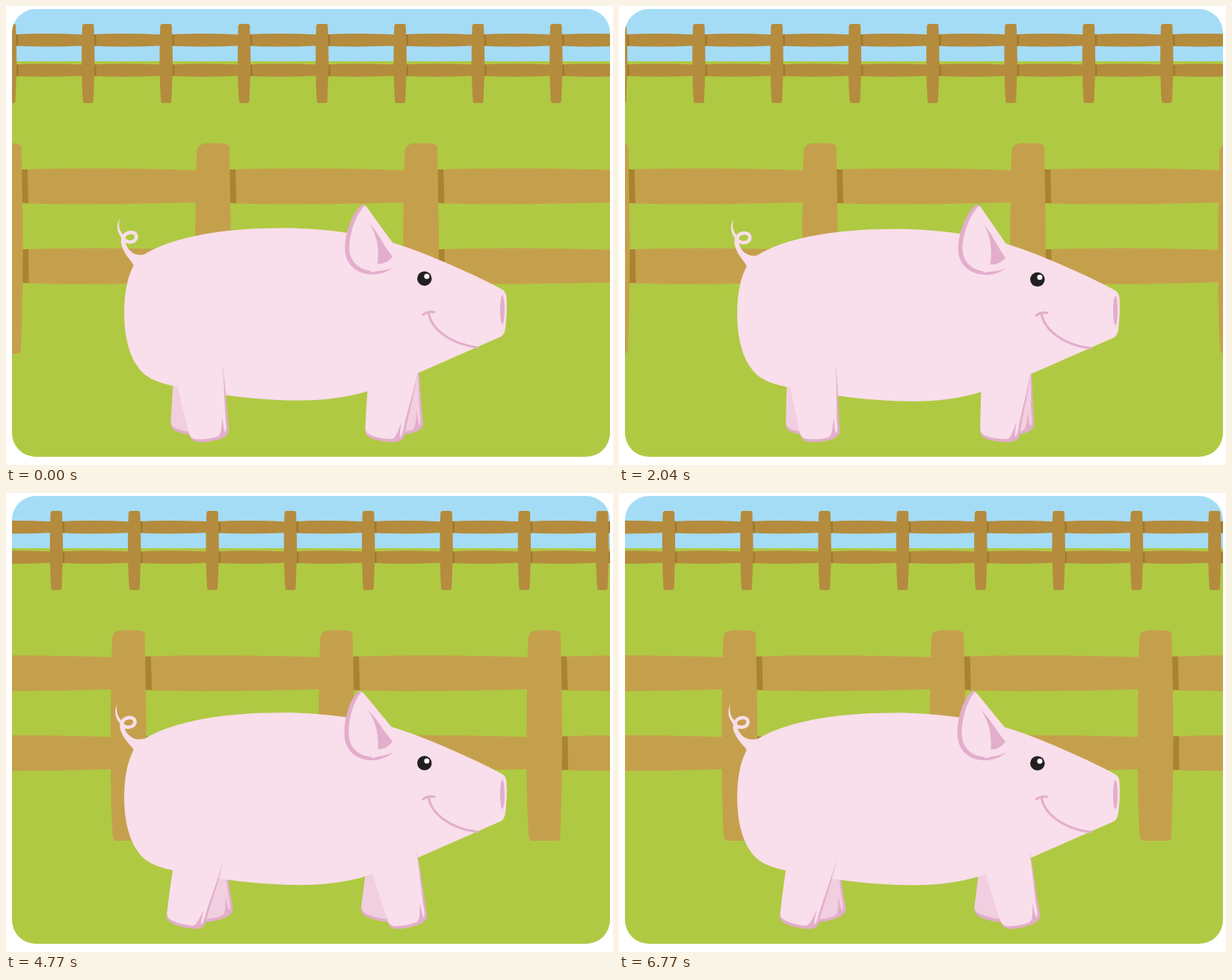
These frames come from a looping animation (812 by 615 pixels, 6.9 s). An HTML page without scripts:

```html
<!DOCTYPE html>
<html lang="en">
<head>
<meta charset="utf-8">
<title>Walking pig</title>
<style>
  @property --t { syntax: "<number>"; inherits: true; initial-value: 0; }

  html, body { margin: 0; width: 100%; height: 100%; overflow: hidden; background: #fff; }

  /* --t is the clock in seconds, --u the swing of the legs from -1 to 1 */
  svg {
    display: block;
    width: 812px;
    height: 615px;
    --u: cos((var(--t) / 1.982 - .865) * 360deg);
    --lift: (.436 - var(--u) * var(--u));
    animation: clock 6.9s steps(1) infinite;
  }

  .far-fence { transform: translateX(calc(var(--t) / 1.982 * -104.33px)); }
  .near-fence { transform: translateX(calc(var(--t) / 1.982 * -278.2px)); }
  .body { transform: translateY(calc(var(--lift) * 6.6px)); }
  .ear, .tail { transform: rotate(calc(var(--lift) * 7.3deg)); }
  .ear { transform-origin: 517px 336px; }
  .tail { transform-origin: 178px 340px; }
  .fore { transform: rotate(calc(var(--u) * -13.3deg)); }
  .back { transform: rotate(calc(var(--u) * 13.3deg)); }

  .skin { fill: #f9deeb; }
  .shade { fill: #e2aecb; }
  .line { fill: none; stroke: #e2aecb; stroke-width: 3; stroke-linecap: round; }
  .near { color: #f9deeb; }
  .far { color: #f1cfe0; }

  @keyframes clock {
    0% { --t: 0; }
    .724% { --t: .05; }
    10.144% { --t: .7; }
    11.304% { --t: .78; }
    20% { --t: 1.38; }
    21.739% { --t: 1.5; }
    29.565% { --t: 2.04; }
    31.304% { --t: 2.16; }
    32.608% { --t: 2.25; }
    41.594% { --t: 2.87; }
    43.333% { --t: 2.99; }
    51.884% { --t: 3.58; }
    53.623% { --t: 3.7; }
    63.478% { --t: 4.38; }
    64.782% { --t: 4.47; }
    69.13% { --t: 4.77; }
    70.869% { --t: 4.89; }
    73.913% { --t: 5.1; }
    75.217% { --t: 5.19; }
    83.913% { --t: 5.79; }
    85.652% { --t: 5.91; }
    94.637% { --t: 6.53; }
    96.376% { --t: 6.65; }
    98.115% { --t: 6.77; }
    100% { --t: 6.9; }
    .724%, 11.304%, 21.739%, 32.608%, 43.333%, 75.217%, 85.652% { animation-timing-function: steps(6); }
    53.623% { animation-timing-function: steps(7); }
    64.782% { animation-timing-function: steps(3); }
    70.869% { animation-timing-function: steps(2); }
  }
</style>
</head>
<body>
<svg viewBox="0 0 812 615" role="img" aria-label="A pig walking past wooden fences">
  <defs>
    <clipPath id="card"><rect x="8" y="4" width="800" height="600" rx="32"/></clipPath>

    <!-- far fence: one section, then doubled -->
    <g id="s1">
      <path id="srail" fill="#b58c3e" d="M10,38.3 Q55,35.6 106,38.2 V53.2 Q55,55.6 10,53.2Z"/>
      <use href="#srail" y="40.4"/>
      <path fill="#a0782c" d="M16,38.2H19.6L20,53.3H16ZM16,78.6H19.6L20,93.7H16Z"/>
      <path fill="#b58c3e" d="M1,28 Q1,24 4,24 H14 Q16.6,24 16.6,27 C17,45 18,65 17.6,85 L16,127 Q16,130 13.5,130 H4.5 Q2,130 2,127 C0,100 -.2,60 1,28Z"/>
    </g>
    <g id="s2"><use href="#s1"/><use href="#s1" x="104.33"/></g>
    <g id="s4"><use href="#s2"/><use href="#s2" x="208.66"/></g>
    <g id="s8"><use href="#s4"/><use href="#s4" x="417.32"/></g>

    <!-- near fence -->
    <g id="b1">
      <path id="brail" fill="#c5a04c" d="M40,219.2 Q150,215.4 281,220 V263 Q150,267.2 40,264.2Z"/>
      <use href="#brail" y="107"/>
      <path fill="#a9832f" d="M44,219H53.8L55,264H44ZM44,326H55L55.6,371H44Z"/>
      <path fill="#c5a04c" d="M2,196 Q2,185 14,184 Q24,183.4 36,184 Q45.4,184.4 45.6,190 C46,220 47.8,280 47.5,340 C47.4,390 46,430 45,460 Q44.6,466 39,466 H9 Q3.4,466 2.7,460 C.2,420 -.4,370 0,320 C0,270 1,220 2,196Z"/>
    </g>
    <g id="b2"><use href="#b1"/><use href="#b1" x="278.2"/></g>
    <g id="b4"><use href="#b2"/><use href="#b2" x="556.4"/></g>

    <!-- leg hanging straight down from the hip at 0,0 -->
    <g id="leg">
      <path class="shade" d="M31.7,-3 C31.5,28 27.4,58 27,82 Q26.6,90 16,92.8 C6,94.8 -9,95 -18,92.3 Q-26,90 -26.6,81 L-20,40Z"/>
      <path fill="currentColor" d="M-30,-10 L-32,15 C-30.5,45 -28,62 -26.6,79 Q-25.8,86.6 -19,88.4 C-8,91.2 4,91 11.5,89.4 C17,86 17.4,76 20.6,66 C20.4,76 20,82 21.4,85.4 Q24,83 24.2,76 C24.8,55 29.6,28 31.5,-3 L28,-10Z"/>
    </g>
  </defs>

  <g clip-path="url(#card)">
    <rect width="812" height="80" fill="#a5dcf5"/>
    <rect y="74" width="812" height="541" fill="#b0c943"/>

    <g class="far-fence">
      <use href="#s8" x="-3.4"/><use href="#s8" x="831.24"/>
    </g>
    <g class="near-fence">
      <use href="#b4" x="-25"/><use href="#b4" x="1087.8"/>
    </g>

    <g class="far">
      <g transform="translate(259 481)"><use href="#leg" class="back"/></g>
      <g transform="translate(519 481)"><use href="#leg" class="fore"/></g>
    </g>

    <g class="body">
      <g class="tail">
        <path class="skin" d="M172,350 C169,341 156,333 153.6,315 L159.5,313 C160,324 169,336 185,333 L190,345Z"/>
        <path d="M156.6,316 C155,307 162,303 168,303.4 C175,304 176.4,311 171.5,314.6 C167,317.6 160,316.4 156,311.5" fill="none" stroke="#f9deeb" stroke-width="4.6"/>
        <path class="skin" d="M158.5,315 C150,307 145.5,296 152.4,284.6 C148.8,296 153,304 160,310Z"/>
      </g>
      <path class="skin" d="M170.5,348 C172,340 182,333 205,322.5 C250,304 310,297.5 370,297.5 C400,297.5 430,300 457,304 L517,317 C550,327 580,340 610,353.5 C630,362.5 650,372 664,380 Q669,383 669.5,390 C670.4,405 669.6,420 668,432 Q667,440 662,443 L553,491 L484,516 C460,524 425,528.5 393,528.5 C355,528.3 325,525.5 295,521.4 L224,509 C200,504 185,497 176,483 C160,461 157,425 158.4,400 C159.5,380 163,362 170.5,348Z"/>
      <ellipse class="shade" cx="664" cy="407" rx="3" ry="19.5"/>
      <path class="line" d="M558,413.6 Q564.5,408.4 573,410.2 M565.4,412 C569,432 593,453 631,457.4"/>
      <circle cx="559.8" cy="365.2" r="9.7" fill="#231f20"/>
      <circle cx="562.9" cy="362.3" r="3.5" fill="#fff"/>
      <g class="ear">
        <path class="shade" d="M476,266.4 Q478.6,264.8 481,268 L488,277 L488,357 L518,350.4 C510,356 502,359.6 490,359.6 C469,359.4 453.6,346 453.4,325 C453.4,303 464,275 476,266.4Z"/>
        <path class="skin" d="M479.6,267.4 Q481.5,267.6 483.5,270.5 L520,321 L518,350.4 C511,353.4 501,355.6 490,355 C472,354 459.2,342 459.2,324 C459.4,304 468,280 479.6,267.4Z"/>
        <path class="shade" d="M486,291 C497,308 499,325 497,345.4 C506,346.6 513,341 517,336 C505,321 501,308 486,291Z"/>
      </g>
    </g>

    <g class="near">
      <g transform="translate(259 490)"><use href="#leg" class="fore"/></g>
      <g transform="translate(519 490)"><use href="#leg" class="back"/></g>
    </g>
  </g>
</svg>
</body>
</html>
```
